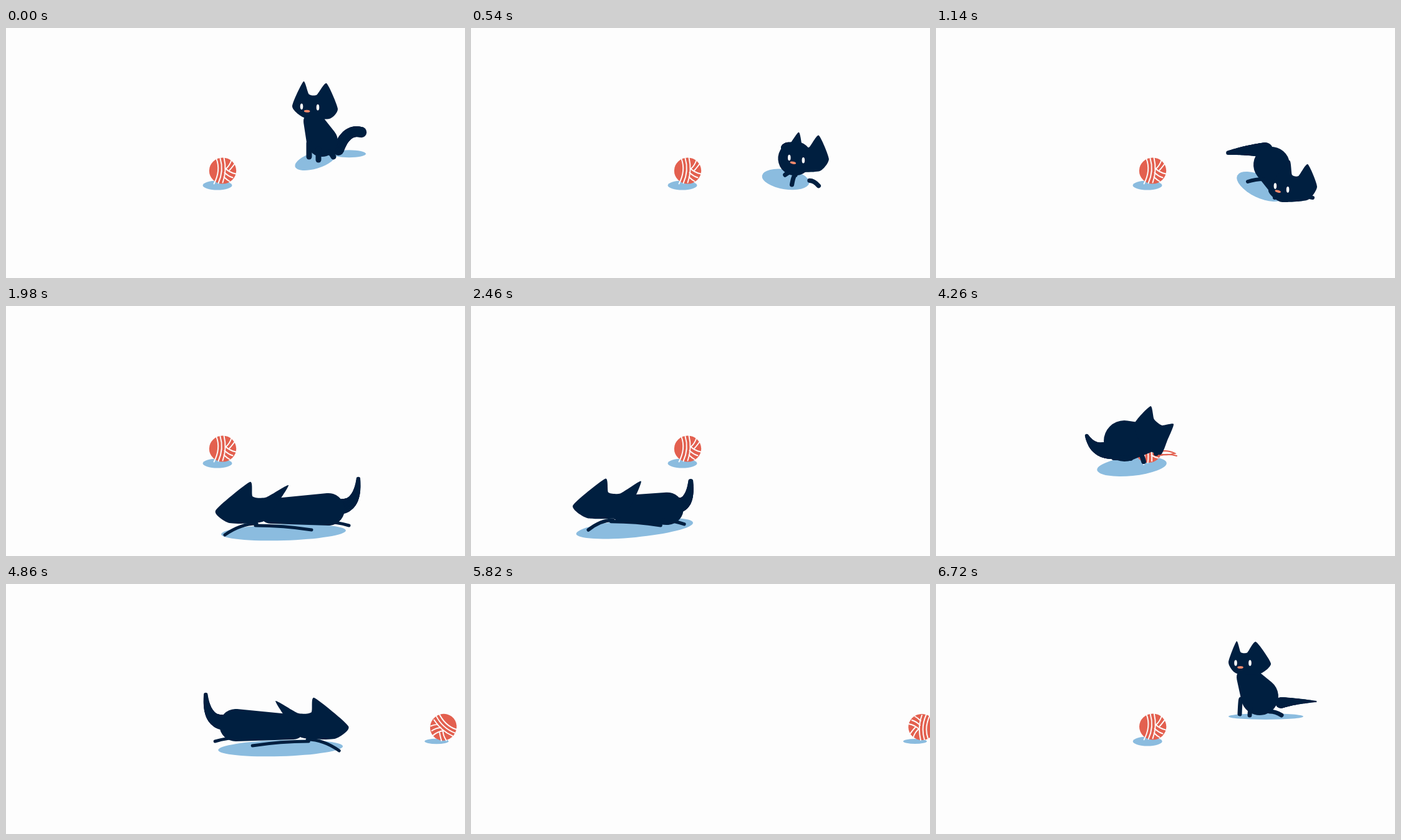
An HTML page with a canvas for the animation above (6780 ms loop, 736 by 402 pixels).

```html
<!DOCTYPE html>
<html lang="en">
<head>
<meta charset="utf-8">
<title>Cat and yarn</title>
<style>
html, body { margin: 0; width: 100%; height: 100%; overflow: hidden; background: #fdfdfd; }
canvas { display: block; }
</style>
</head>
<body>
<canvas id="stage" width="736" height="402"></canvas>
<script>
const ctx = document.getElementById('stage').getContext('2d');
const LOOP = 6780, STEP = 60;
const PAPER = '#fdfdfd', FUR = '#001f40', SHADE = '#8bbcdf', YARN = '#e3604f', NOSE = '#f58a6c';

// head: cheek, ear, notch, ear, cheek, chin    body: rump and chest circles
// tail: base, bend, tip, base and tip radius   legs: root and foot of two front legs and a hind leg
// shadow: centre, radii, tilt, reach under the tail    face: centre, half eye gap, tilt, size
const sit = {
  head: [[459, 126], [477, 86], [492, 107], [514, 89], [532, 130], [498, 145]],
  body: [507, 182, 25, 493, 150, 16],
  tail: [533, 196, 546, 160, 571, 168, 9, 8.5],
  legs: [[486, 185, 486, 207], [501, 195, 501, 212], [518, 200, 525, 207]], paw: 9,
  shadow: [496, 213, 34, 13, -.3, 54], face: [487, 127, 13, .05, 1]
};
const tumble = {
  head: [[533, 260], [566, 213], [576, 237], [596, 219], [611, 255], [574, 278]],
  body: [538, 220, 29, 548, 252, 17],
  tail: [528, 196, 495, 196, 467, 201, 12, 3],
  legs: [[552, 262, 543, 273], [580, 270, 604, 273], [525, 243, 500, 247]], paw: 6,
  shadow: [520, 255, 41, 18, .45, 0], face: [554, 257, 10.5, .28, 1]
};
const run = {
  head: [[336, 329], [391, 283], [406, 307], [453, 288], [430, 325], [385, 348]],
  body: [517, 327, 26, 425, 330, 20],
  tail: [540, 322, 564, 318, 565, 276, 12, 3],
  legs: [[402, 350, 351, 368], [400, 353, 490, 360], [510, 347, 550, 353]], paw: 5,
  shadow: [445, 364, 100, 13, -.03, 0], face: [358, 325, 8, 0, 0]
};
const turn = {
  head: [[193, 266], [228, 238], [242, 255], [261, 237], [290, 271], [250, 290]],
  body: [184, 309, 27, 226, 294, 29],
  tail: [178, 300, 168, 305, 166, 292, 12, 8],
  legs: [[248, 302, 271, 306], [240, 300, 262, 303], [172, 320, 180, 328]], paw: 8,
  shadow: [238, 311, 62, 23, -.45, 0], face: [276, 264, 7, 0, 0]
};
const grab = {
  head: [[318, 190], [344, 161], [356, 187], [381, 190], [371, 216], [345, 232]],
  body: [302, 217, 33, 335, 213, 24],
  tail: [285, 230, 254, 238, 241, 207, 16, 2.5],
  legs: [[326, 236, 333, 250], [360, 220, 353, 237], [285, 244, 312, 245]], paw: 8,
  shadow: [314, 258, 56, 15, -.1, 0], face: [358, 211, 6, 0, 0]
};
const rest = {
  head: [[469, 126], [482, 92], [494, 110], [513, 93], [537, 128], [500, 144]],
  body: [519, 181, 30, 500, 150, 18],
  tail: [553, 191, 575, 188, 611, 189, 9, 1],
  legs: [[489, 185, 487, 209], [505, 195, 503, 211], [535, 205, 554, 211]], paw: 7,
  shadow: [529, 213, 60, 5, 0, 0], face: [492, 127, 11.5, 0, 1]
};

const flipX = (list, ...at) => list.map((v, i) => at.includes(i) ? 736 - v : v);
const chase = {
  ...run,
  head: [4, 3, 2, 1, 0, 5].map(i => flipX(run.head[i], 0)),
  body: flipX(run.body, 0, 3),
  tail: flipX(run.tail, 0, 2, 4),
  legs: run.legs.map(leg => flipX(leg, 0, 2)),
  shadow: flipX(run.shadow, 0),
  face: flipX(run.face, 0)
};

// time, pose, dx, dy
const CAT = [
  [0, sit, 0, 0], [300, sit, -3, 3], [720, tumble, -8, 6], [1140, tumble, 0, 0],
  [1440, run, 14, -12], [1980, run, 0, 0], [2160, run, -172, 4], [2340, run, -180, 2],
  [2820, turn, 10, 0], [3240, turn, 0, 0], [3660, turn, -58, 8], [4140, grab, 0, 0],
  [4500, grab, 0, 0], [4680, chase, 62, -100], [5400, chase, 620, -100],
  [5880, run, 410, -145], [6420, run, 135, -145], [6720, rest, 0, 0], [LOOP, sit, 0, 0]
];
// time, x, y
const BALL = [
  [0, 347.5, 229.5], [4080, 347.5, 229.5], [4200, 341, 231], [4560, 341, 231], [5100, 790, 230],
  [5760, 790, 230], [5820, 723, 230], [6600, 349, 229], [LOOP, 347.5, 229.5]
];

const smooth = u => u * u * (3 - 2 * u);
const easeOut = u => 1 - (1 - u) * (1 - u);
const mix = (a, b, u) => Array.isArray(a) ? a.map((v, i) => mix(v, b[i], u)) : a + (b - a) * u;

function segment(keys, t, ease) {
  const i = keys.findIndex(k => k[0] > t);
  const a = keys[i - 1], b = keys[i];
  return [a, b, ease((t - a[0]) / (b[0] - a[0]))];
}

function oval(x, y, rx, ry, color, tilt = 0) {
  ctx.beginPath();
  ctx.ellipse(x, y, rx, ry, tilt, 0, 7);
  ctx.fillStyle = color;
  ctx.fill();
}

function line(path, color, width) {
  ctx.strokeStyle = color;
  ctx.lineWidth = width;
  ctx.stroke(path);
}

// Closed curve through the points; k sets how round the corners are.
function blob(p, k) {
  const n = p.length, at = i => p[(i + n) % n];
  ctx.beginPath();
  ctx.moveTo(...p[0]);
  for (let i = 0; i < n; i++) {
    const a = at(i - 1), b = at(i), c = at(i + 1), d = at(i + 2);
    ctx.bezierCurveTo(b[0] + (c[0] - a[0]) * k, b[1] + (c[1] - a[1]) * k,
      c[0] - (d[0] - b[0]) * k, c[1] - (d[1] - b[1]) * k, c[0], c[1]);
  }
  ctx.fillStyle = FUR;
  ctx.fill();
}

// The point m spread into two along the direction a to b.
const spread = (m, a, b, k) => [-k, k].map(s => [m[0] + (b[0] - a[0]) * s, m[1] + (b[1] - a[1]) * s]);

function drawHead([cheekL, earL, notch, earR, cheekR, chin]) {
  const [jawL, jawR] = spread(chin, cheekL, cheekR, .28);
  blob([cheekL, earL, ...spread(notch, earL, earR, .17), earR, cheekR, jawR, jawL], .1);
}

// Outline around two circles.
function drawBody([x, y, r, x2, y2, r2]) {
  const dir = Math.atan2(y2 - y, x2 - x);
  const open = Math.acos(Math.max(-1, Math.min(1, (r - r2) / Math.hypot(x2 - x, y2 - y))));
  ctx.beginPath();
  ctx.arc(x, y, r, dir + open, dir - open + 2 * Math.PI);
  ctx.arc(x2, y2, r2, dir - open, dir + open);
  ctx.fillStyle = FUR;
  ctx.fill();
}

function drawTail([x, y, bx, by, tx, ty, r, tip]) {
  for (let u = 0; u <= 1; u += 1 / 40) {
    const [px, py] = mix(mix([x, y], [bx, by], u), mix([bx, by], [tx, ty], u), u);
    const size = mix(r, tip, u);
    oval(px, py, size, size, FUR);
  }
}

function drawLeg([x, y, footX, footY], width) {
  const leg = new Path2D();
  leg.moveTo(x, y);
  leg.quadraticCurveTo((x + footX) / 2, y, footX, footY);
  line(leg, FUR, width);
}

function drawFace([x, y, gap, tilt, size]) {
  if (size < .4) return;
  ctx.translate(x, y);
  ctx.rotate(tilt);
  ctx.scale(size, size);
  oval(-gap, 0, 2.3, 4.8, PAPER, -tilt);
  oval(gap, 0, 2.3, 4.8, PAPER, -tilt);
  oval(-4, 7, 4.8, 2, NOSE);
}

function drawShadow([x, y, rx, ry, tilt, reach]) {
  oval(x, y, rx, ry, SHADE, tilt);
  oval(x + reach, y - reach / 5, reach / 2, reach / 9, SHADE);
}

const strands = new Path2D();
for (let i = 0; i < 3; i++) {
  const arc = (x, y, ...bend) => { strands.moveTo(x, y); strands.quadraticCurveTo(...bend); };
  arc(-10 + 6 * i, -19 - i, -3 + 5 * i, 0, -14 + 7 * i, 21 - i);
  arc(4 - i, -4 + 7 * i, 11 - 2 * i, 3 + 6 * i, 21 - 5 * i, 5 + 6 * i);
  if (i) arc(9 + 5 * i, -23 + 6 * i, 8 + 3 * i, -12 + 4 * i, -1 + 6 * i, -5 + 2 * i);
}
const thread = new Path2D('M14 4Q28-1 42 6Q30 10 18 7M20 9Q32 6 45 10');

function drawBall(x, y, roll, loose) {
  ctx.save();
  ctx.translate(x, y);
  if (loose) line(thread, YARN, 2);
  ctx.rotate(roll * 5 * Math.PI);
  oval(0, 0, 21.7, 21, YARN);
  line(strands, PAPER, 1.9);
  ctx.restore();
}

function draw(t) {
  const [a, b, u] = segment(CAT, t, smooth);
  const [dx, dy] = mix(a.slice(2), b.slice(2), u);
  const part = name => mix(a[1][name], b[1][name], u);
  const hop = t > 3660 && t < 4140 ? 60 * Math.sin(Math.PI * (t - 3660) / 480) : 0;

  const [from, to, v] = segment(BALL, t, easeOut);
  const [, x, y] = mix(from, to, v);
  const roll = (x - 347.5) / 375.5;
  const far = Math.min(1, Math.abs(roll));

  ctx.fillStyle = PAPER;
  ctx.fillRect(0, 0, 736, 402);
  ctx.lineCap = 'round';
  oval(x - 8.5 - 2.5 * far, 253, 23.5 - 4.5 * far, 7.5 - 3.5 * far, SHADE);
  ctx.save();
  ctx.translate(dx, dy);
  drawShadow(part('shadow'));
  ctx.restore();
  drawBall(x, y, roll, t >= 4140 && t < 4620);

  ctx.save();
  ctx.translate(dx, dy - hop);
  drawTail(part('tail'));
  drawBody(part('body'));
  for (const leg of part('legs')) drawLeg(leg, part('paw'));
  drawHead(part('head'));
  drawFace(part('face'));
  ctx.restore();
}

function frame() {
  draw(Math.floor(performance.now() % LOOP / STEP) * STEP);
  requestAnimationFrame(frame);
}
frame();
</script>
</body>
</html>
```
